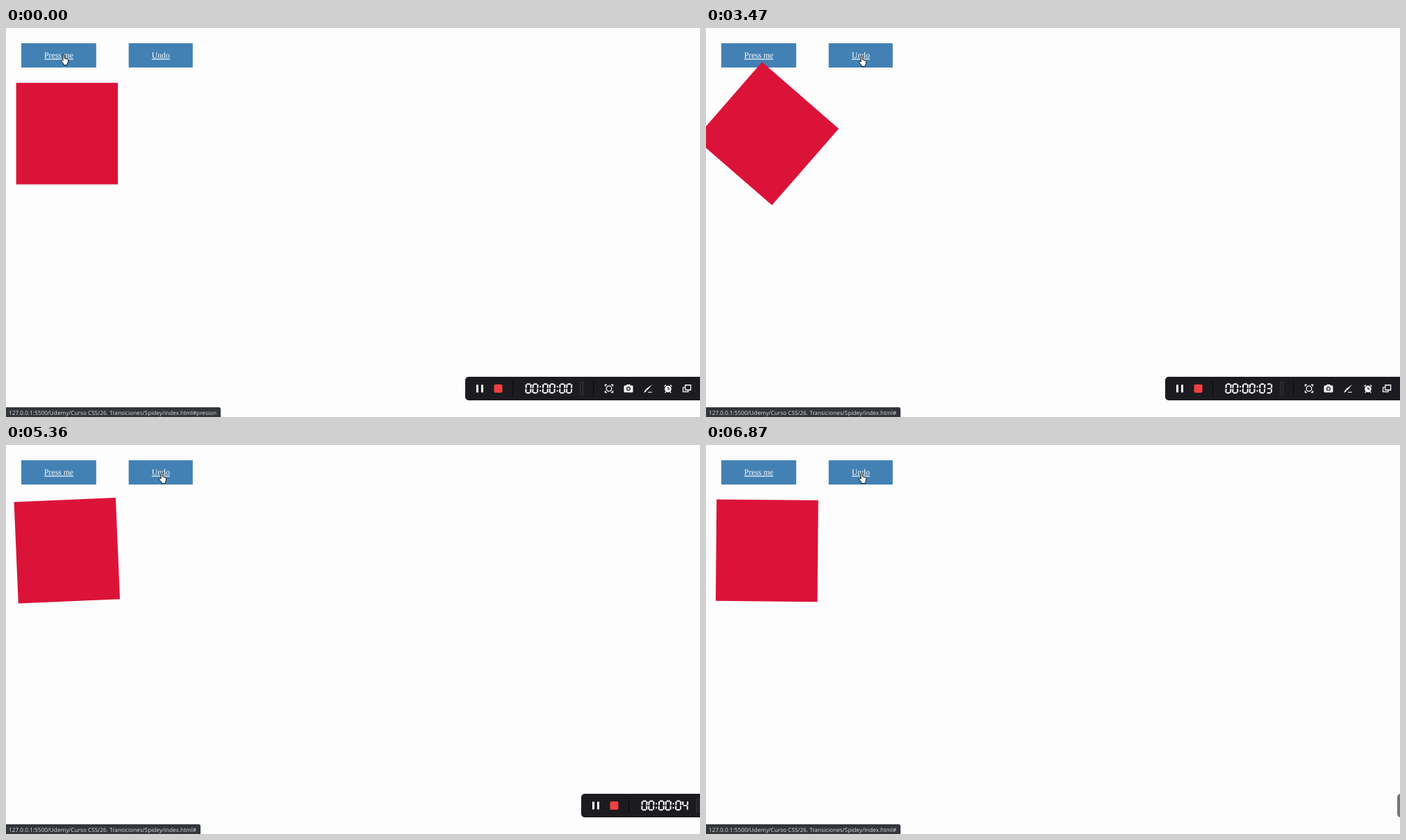
An HTML page for the animation above (6990 ms loop, 999 by 561 pixels).

```html
<!DOCTYPE html>
<html lang="en">
<head>
<meta charset="utf-8">
<title>Rotation transition</title>
<style>
html, body { margin: 0; width: 100%; height: 100%; overflow: hidden; background: #fdfdfd; }
svg { display: block; width: 999px; height: 561px; }
text { text-rendering: geometricPrecision; }
.button rect { fill: #4381b4; }
.button text { font: 11.7px "Liberation Serif", serif; fill: #fff; text-anchor: middle; text-decoration: underline; }
#square { fill: #dc1339; }
#status rect { fill: #323539; }
#status text { font: 8.24px "Open Sans", sans-serif; fill: #dcdfe2; }
.line { fill: none; stroke: #fff; stroke-width: 1.3; }
.solid { fill: #fff; }
#clock { fill: none; stroke: #fff; stroke-width: 2; }
#hand, #arrow { fill: #fff; stroke: #111; stroke-width: 1; stroke-linejoin: round; }
</style>
</head>
<body>
<svg viewBox="0 0 999 561">
  <g class="button" id="press">
    <rect x="22" y="22" width="107.8" height="35"/>
    <text x="76" y="43.3">Press me</text>
  </g>
  <g class="button" id="undo">
    <rect x="176.6" y="22" width="92.2" height="35"/>
    <text x="222.8" y="43.3">Undo</text>
  </g>
  <rect id="square" x="14.6" y="79.1" width="146.4" height="146.4"/>

  <g id="status">
    <rect x="-4" y="547" width="313" height="18" rx="2.5"/>
    <text x="4" y="558"></text>
  </g>

  <g id="bar">
    <rect x="661" y="503" width="350" height="34" rx="5" fill="#1c1c20"/>
    <path class="solid" d="M677 514.5h3v11h-3zM684 514.5h3v11h-3z"/>
    <rect x="702.5" y="514" width="12" height="12" rx="2" fill="#f04040"/>
    <path d="M729.5 510v20M845.5 510v20" stroke="#08080a"/>
    <path d="M827 510v20M830.5 510v20" stroke="#48484c" stroke-width="1.4" stroke-dasharray="1.4 1.2"/>
    <g id="clock"></g>
    <g class="line">
      <circle cx="868" cy="520" r="3.8"/>
      <path d="M862.5 517v-2.5h2.5M871 514.5h2.5v2.5M873.5 523v2.5h-2.5M865 525.5h-2.5v-2.5"/>
    </g>
    <path class="solid" d="M891 515.5h2l1-1.5h4l1 1.5h2q1.5 0 1.5 1.5v7q0 1.5-1.5 1.5h-10q-1.5 0-1.5-1.5v-7q0-1.5 1.5-1.5z"/>
    <circle cx="896" cy="520.3" r="2.4" fill="#fff" stroke="#1c1c20" stroke-width="1.3"/>
    <path class="solid" d="M930.5 514l-7.5 8.5-2-1.7zM920.4 521.3l2 1.8q-1.4 2.6-4.4 2.6 1.3-1.4 2.4-4.4zM924 524.8h6v1h-6z"/>
    <circle class="solid" cx="953" cy="520.6" r="4.8"/>
    <path d="M953 517.7v3.2h2.4" fill="none" stroke="#1c1c20" stroke-width="1.2"/>
    <path class="line" d="M947.5 517l2.5-2.3M956 514.7l2.5 2.3M950 524.5l-1.3 1.5M956 524.5l1.3 1.5"/>
    <path class="line" d="M977.8 515h7.8v7h-7.8zM977.5 518.3h-2.9v6.4h7.4v-2.3"/>
  </g>

  <path id="hand" d="M3 1.3a1.1 1.1 0 0 1 2.2 0V5.6l3.8.9q1.8.4 1.6 2l-.5 3.4-1 2.1v1.6H4V14L1 10.3Q-.3 8.6.6 8T3 9Z"/>
  <path id="arrow" d="M0 0v13l3-2.7 2 4.6 2-.9-2-4.4h4.2z"/>
</svg>

<script>
const LOOP = 6990, STEP = 126, FIRST_STEP = 2834;
const URL_TEXT = '127.0.0.1:5500/Udemy/Curso CSS/26. Transiciones/Spidey/index.html#';

const $ = s => document.querySelector(s);
const press = $('#press'), undo = $('#undo'), square = $('#square');
const statusBox = $('#status rect'), statusText = $('#status text');
const bar = $('#bar'), clock = $('#clock'), hand = $('#hand'), arrow = $('#arrow');

const clamp = v => Math.max(0, Math.min(1, v));
const ramp = (t, from, to) => clamp((t - from) / (to - from));

// CSS "ease": cubic-bezier(.25, .1, .25, 1)
function ease(x) {
  const curve = (a, b, u) => 3 * a * u * (1 - u) ** 2 + 3 * b * u * u * (1 - u) + u ** 3;
  let lo = 0, hi = 1;
  for (let i = 0; i < 24; i++) {
    const mid = (lo + hi) / 2;
    if (curve(.25, .25, mid) < x) lo = mid; else hi = mid;
  }
  return curve(.1, 1, lo);
}

const SEGMENTS = {
  a: 'M1.6 1h5', b: 'M7.6 1.4v5.2', c: 'M7.6 8v5.2', d: 'M1.6 13.6h5',
  e: 'M.8 8v5.2', f: 'M.8 1.4v5.2', g: 'M1.7 7.3h4.8'
};
const DIGITS = ['abcdef', 'bc', 'abdeg', 'abcdg', 'bcfg'];

function drawClock(seconds) {
  const digits = [0, 0, 0, 0, 0, seconds];
  let x = 748, out = '';
  digits.forEach((n, i) => {
    if (i && i % 2 === 0) {
      out += `<path d="M${x + .4} 517.3h2M${x + .4} 523.3h2"/>`;
      x += 4.6;
    }
    const d = [...DIGITS[n]].map(s => SEGMENTS[s]).join('');
    out += `<path transform="translate(${n === 1 ? x - 2 : x} 512.6) skewX(-2)" d="${d}"/>`;
    x += 9.9;
  });
  clock.innerHTML = out;
}

function angleAt(t) {
  if (t < 5304) return 180 * ease(ramp(t, 2801, 4329));
  const x = .283 * ramp(t, 5304, 5858) + .647 * ramp(t, 5858, 6866);
  return 180 * (1 - ease(x));
}

function zoom(button, cx, active) {
  const k = active ? 1.45 : 1;
  button.setAttribute('transform', `translate(${cx} 39.5) scale(${k}) translate(${-cx} -39.5)`);
}

function moveCursor(t) {
  const u = ramp(t, 2840, 3400), s = u * u * (3 - 2 * u);
  const x = 79 + 141 * s;
  const y = (t < 2060 ? 38 : 37) + 3 * s;
  const tip = x + 4, between = tip > 130 && tip < 176;
  hand.setAttribute('transform', `translate(${x} ${y})`);
  arrow.setAttribute('transform', `translate(${tip} ${y})`);
  hand.style.display = between ? 'none' : '';
  arrow.style.display = between ? '' : 'none';
  const onUndo = tip >= 176;
  statusBox.setAttribute('width', onUndo ? 284 : 313);
  statusText.textContent = URL_TEXT + (onUndo ? '' : 'presion');
}

let shown = -1;
function draw(time) {
  const t = time < FIRST_STEP ? time : FIRST_STEP + Math.floor((time - FIRST_STEP) / STEP) * STEP;

  square.setAttribute('transform', `rotate(${angleAt(t)} 87.8 152.3)`);
  zoom(press, 76, t >= 2310 && t < FIRST_STEP);
  zoom(undo, 222.8, t >= 4850 && t < 5304);
  moveCursor(t);

  bar.setAttribute('transform', `translate(${334 * ramp(t, 5044, 5664)} 0)`);
  bar.setAttribute('opacity', 1 - .4 * ramp(t, 6240, 6860));

  const seconds = [2060, 2834, 3338, 4346].filter(s => t >= s).length;
  if (seconds !== shown) drawClock(shown = seconds);
}

const start = performance.now();
function frame() {
  draw((performance.now() - start) % LOOP);
  requestAnimationFrame(frame);
}
frame();
</script>
</body>
</html>
```
